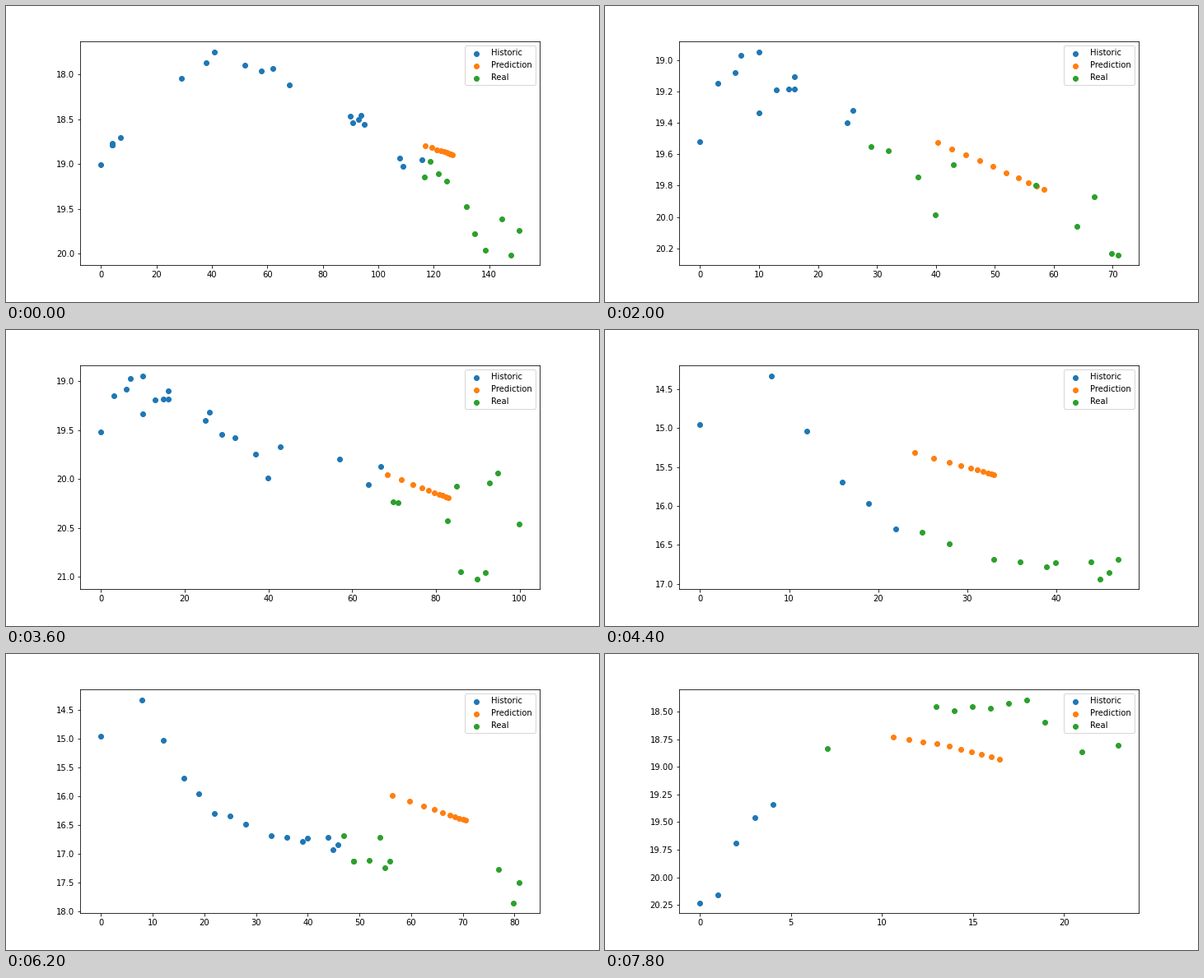
These frames come from a looping animation (720 px wide and 360 px high, 8 s). A matplotlib script:

```python
import numpy as np
import matplotlib.pyplot as plt
from matplotlib.animation import FuncAnimation

FRAMES, STEP_MS = 40, 200
FIRST, RUN, AHEAD = 3, 18, 10    # shortest history, windows per curve, points ahead
DAY = 0.998

# Forecast keys: history size, x start, x span, y start, y span,
# x decay, y decay, wobble
curve_a = dict(
    days=[0, 4, 4, 4, 7, 29, 38, 41, 52, 58, 62, 68, 90, 91, 93,
          94, 95, 108, 109, 116, 117, 119, 122, 125, 132, 135, 139, 145, 148, 151],
    mags=[19.01, 18.772, 18.785, 18.785, 18.703, 18.042, 17.868, 17.745, 17.895, 17.96,
          17.932, 18.116, 18.464, 18.538, 18.501, 18.455, 18.556, 18.932, 19.024, 18.951,
          19.143, 18.969, 19.107, 19.189, 19.473, 19.776, 19.96, 19.611, 20.015, 19.74],
    keys=[(20, 116.8, 9.8, 18.794, 0.101, 0.78, 0.78, 0)])

curve_b = dict(
    days=[0, 3, 6, 7, 10, 10, 13, 15, 16, 16, 25, 26, 29, 32, 37,
          40, 43, 57, 64, 67, 70, 71, 83, 85, 86, 90, 92, 93, 95, 100],
    mags=[19.517, 19.149, 19.081, 18.97, 19.336, 18.945, 19.189, 19.182, 19.104, 19.182,
          19.401, 19.319, 19.549, 19.578, 19.746, 19.986, 19.667, 19.797, 20.06, 19.871,
          20.234, 20.242, 20.423, 20.073, 20.944, 21.02, 20.958, 20.037, 19.937, 20.464],
    keys=[(3, 13, 13, 19.14, 0.17, 0.95, 0.96, 0.013),
          (8, 28.95, 14.95, 19.262, 0.194, 0.95, 0.96, 0.013),
          (15, 48.85, 20.25, 19.722, 0.378, 0.91, 0.91, 0.028),
          (20, 68.4, 14.5, 19.957, 0.233, 0.8, 0.8, 0)])

curve_c = dict(
    days=[0, 8, 12, 16, 19, 22, 25, 28, 33, 36, 39, 40, 44, 45, 46,
          47, 49, 49, 52, 54, 55, 56, 77, 80, 81, 83, 86, 90, 93, 96],
    mags=[14.955, 14.325, 15.034, 15.693, 15.966, 16.3, 16.341, 16.489, 16.693, 16.716,
          16.784, 16.727, 16.716, 16.938, 16.852, 16.693, 17.135, 17.135, 17.125, 16.716,
          17.243, 17.129, 17.271, 17.857, 17.5, 17.6, 17.85, 17.7, 17.95, 17.8],
    keys=[(3, 14, 9, 15.05, 0.3, 0.78, 0.78, 0),
          (10, 37.5, 8.8, 15.66, 0.27, 0.78, 0.78, 0),
          (15, 56.3, 14.2, 15.993, 0.428, 0.79, 0.79, 0),
          (20, 71, 14, 16.35, 0.42, 0.79, 0.79, 0)])

curve_d = dict(
    days=[0, 1, 2, 3, 4, 7, 13, 14, 15, 16, 17, 18, 19, 21, 23],
    mags=[20.23, 20.162, 19.687, 19.457, 19.338, 18.834, 18.455, 18.492, 18.455, 18.47,
          18.426, 18.393, 18.596, 18.863, 18.804],
    keys=[(3, 8, 5, 19.1, 0.2, 0.93, 1.02, 0),
          (5, 10.61, 5.85, 18.73, 0.204, 0.93, 1.02, 0)])

curves = [curve_a, curve_b, curve_c, curve_d]


def settle(decay, wobble):
    """Steps from 0 to 1 that shrink by a constant ratio."""
    k = np.arange(AHEAD)
    last = AHEAD - 1
    return (1 - decay**k) / (1 - decay**last) - wobble * np.sin(2 * np.pi * k / last)


def forecast(keys, n):
    cols = np.array(keys, float).T
    x, dx, y, dy, rx, ry, w = (np.interp(n, cols[0], c) for c in cols[1:])
    return x + dx * settle(rx, w), y + dy * settle(ry, w)


plt.rcParams["font.family"] = "DejaVu Sans"
fig, ax = plt.subplots(figsize=(10, 5), dpi=72)
fig.subplots_adjust(left=0.125, right=0.9, bottom=0.125, top=0.88)


def draw(frame):
    which, pos = divmod(frame + RUN - 1, RUN)
    n = FIRST + pos
    curve = curves[which]
    t = np.array(curve["days"]) * DAY
    mag = np.array(curve["mags"])

    ax.clear()
    ax.scatter(t[:n], mag[:n], label="Historic")
    ax.scatter(*forecast(curve["keys"], n), label="Prediction")
    ax.scatter(t[n:n + AHEAD], mag[n:n + AHEAD], label="Real")
    ax.invert_yaxis()
    ax.legend(loc="best")
    return []


anim = FuncAnimation(fig, draw, frames=FRAMES, interval=STEP_MS,
                     repeat=True, repeat_delay=0, blit=False)
plt.show()
```
